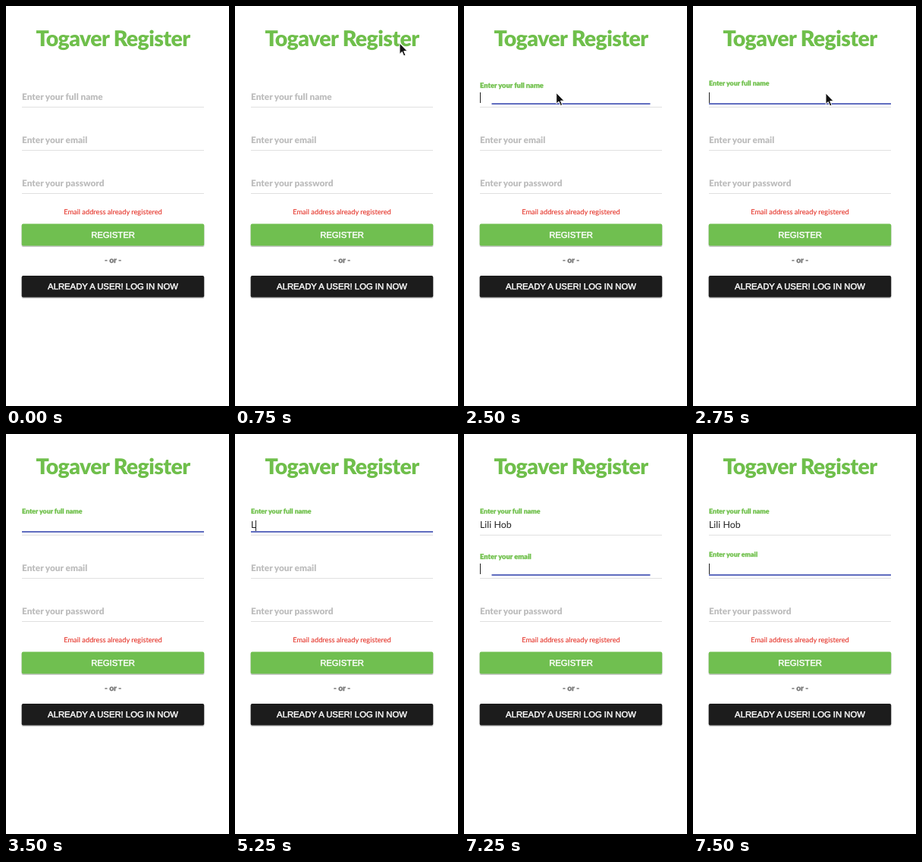
Recreate the animation shown at these times as an HTML page. Size 294 px wide and 528 px high, loop 8000 ms.

```html
<!DOCTYPE html>
<html lang="en">
<head>
<meta charset="utf-8">
<title>Register form</title>
<style>
  html, body { margin: 0; width: 100%; height: 100%; overflow: hidden; background: #fff; }
  svg { display: block; width: 294px; height: 528px; text-rendering: geometricPrecision; }
  text { font: 12.4px Lato, "Open Sans", sans-serif; white-space: pre; }
  .mid { text-anchor: middle; }
  .title { font-size: 28.5px; font-weight: 900; letter-spacing: -.6px; fill: #6fbf4b; }
  .label { font-size: 11.8px; font-weight: 900; fill: #bdbdbd; }
  .label.up { fill: #70c04c; stroke: #70c04c; stroke-width: .35px; }
  .error { font-size: 9.25px; fill: #e5352b; stroke: #e5352b; stroke-width: .12px; }
  .or { font-size: 10.2px; font-weight: 900; fill: #777; stroke: #777; stroke-width: .25px; }
  .button { font: 11.3px "Liberation Sans", Arial, sans-serif; fill: #fff; stroke: #fff; stroke-width: .45px; }
  .rule { fill: #e0e0e0; }
  .focus { fill: #4453b4; }
  .shadow { fill: #000; opacity: .22; }
</style>
</head>
<body>
<svg viewBox="0 0 294 528">
  <text class="title mid" x="141" y="52.5">Togaver Register</text>
  <g id="fields"></g>
  <text id="typed" x="21" y="124.2" fill="#222"></text>
  <rect id="caret" width="1" height="14" fill="#222"/>
  <text class="error mid" x="141" y="275">Email address already registered</text>
  <rect class="shadow" x="20.5" y="288.4" width="241" height="29.5" rx="2"/>
  <rect x="20.7" y="287.4" width="240.5" height="29" rx="2" fill="#70bf50"/>
  <text class="button mid" x="141" y="305.8">REGISTER</text>
  <text class="or mid" x="141" y="338.7">- or -</text>
  <rect class="shadow" x="20.5" y="356.4" width="241" height="29.5" rx="2"/>
  <rect x="20.7" y="355.9" width="240.5" height="28.6" rx="2" fill="#1c1c1c"/>
  <text class="button mid" x="141" y="374">ALREADY A USER! LOG IN NOW</text>
  <path id="pointer" d="M0 0V14.5L3.3 11.5L5.6 17L8 16L5.7 10.7H10.3Z" fill="#111" stroke="#fff" stroke-width="1"/>
</svg>
<script>
const LOOP = 8000, STEP = 250, LEFT = 21, GAP = 57;
const NAME = "Lili Hob";
const $ = id => document.getElementById(id);
const typed = $("typed"), caret = $("caret"), pointer = $("pointer");

// Pointer stops: start time, x, y (no position means hidden)
const stops = [[0], [750, 217, 49], [1000, 173, 85], [1250, 121.7, 114.5], [2750, 175, 115], [3000, 282, 139.5], [3250]];
// Typing: start time, letters shown
const keys = [[0, 0], [5250, 1], [5500, 2], [5750, 3], [6000, 5], [6250, 6], [6500, 7], [6750, 8]];

const at = (list, t) => list.filter(k => k[0] <= t).pop();

function add(tag, attrs) {
  const el = document.createElementNS("http://www.w3.org/2000/svg", tag);
  for (const k in attrs) el.setAttribute(k, attrs[k]);
  return $("fields").appendChild(el);
}

const fields = [
  { hint: "Enter your full name", from: 2500, to: 7250 },
  { hint: "Enter your email", from: 7250, to: LOOP },
  { hint: "Enter your password", from: LOOP, to: LOOP }
].map((f, i) => {
  const top = i * GAP;
  add("rect", { class: "rule", x: LEFT, y: 133 + top, width: 240, height: 1 });
  const line = add("rect", { class: "focus", y: 128.3 + top, height: 1.7 });
  const label = add("text", { class: "label" });
  label.textContent = f.hint;
  return { ...f, top, line, label };
});

function drawField(f, t) {
  const up = t >= f.from, focused = up && t < f.to;
  const p = up ? (t < f.from + STEP ? .84 : 1) : 0;
  f.label.classList.toggle("up", up);
  f.label.setAttribute("transform", `translate(${LEFT} ${124 + f.top - 19 * p}) scale(${1 - .255 * p})`);
  const w = focused ? (p < 1 ? 209 : 240) : 0;
  f.line.setAttribute("x", 141 - w / 2);
  f.line.setAttribute("width", w);
}

function caretShown(t) {
  if (t < 2500) return false;
  return t < 3500 || t >= 5000 || t % 1000 < 500;
}

function draw(now) {
  const t = Math.floor(now % LOOP / STEP) * STEP;
  fields.forEach(f => drawField(f, t));

  typed.textContent = NAME.slice(0, at(keys, t)[1]);
  const inEmail = t >= 7250;
  const w = inEmail || !typed.textContent ? 0 : typed.getComputedTextLength();
  caret.setAttribute("x", Math.round(LEFT + w));
  caret.setAttribute("y", 114 + (inEmail ? GAP : 0));
  caret.style.display = caretShown(t) ? "" : "none";

  const [, x, y] = at(stops, t);
  pointer.style.display = x ? "" : "none";
  if (x) pointer.setAttribute("transform", `translate(${x} ${y})`);
  requestAnimationFrame(() => draw(performance.now()));
}
draw(0);
</script>
</body>
</html>
```
